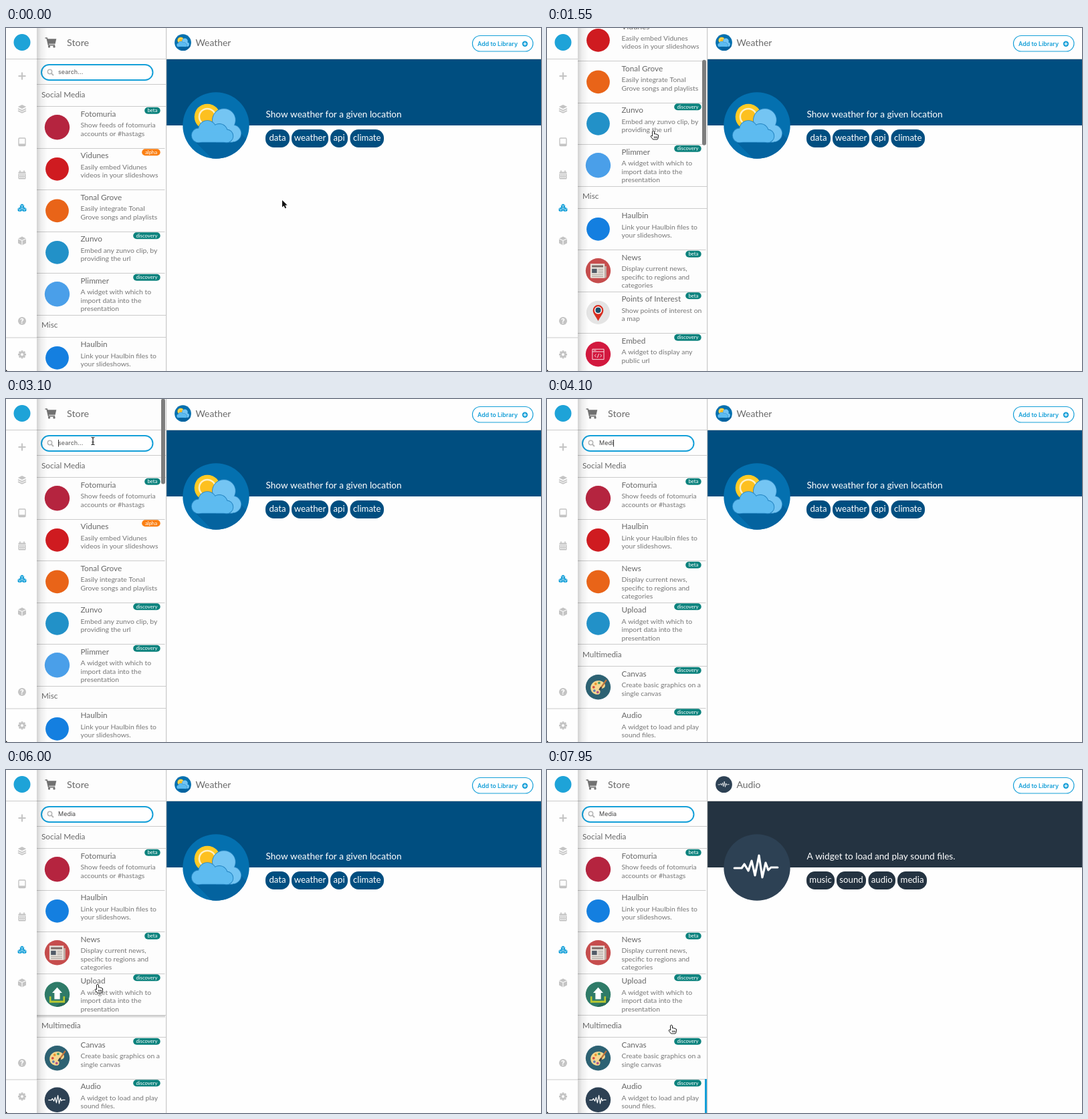
An HTML page with a canvas that plays this animation: 800 by 514 pixels, repeating every 8000 ms.

```html
<!DOCTYPE html>
<html lang="en">
<head>
<meta charset="utf-8">
<title>Widget store</title>
<style>
html, body { margin: 0; width: 100%; height: 100%; overflow: hidden; background: #fff; }
canvas { display: block; width: 800px; height: 514px; }
</style>
</head>
<body>
<canvas id="stage"></canvas>
<script>
const W = 800, H = 514, LOOP = 8000;
const canvas = document.getElementById('stage');
const ctx = canvas.getContext('2d');
const dpr = window.devicePixelRatio || 1;
canvas.width = W * dpr;
canvas.height = H * dpr;

const BLUE = '#149fd8', TEAL = '#0b827d', INK = '#696969', PALE = '#c4c4c4', RULE = '#cbcbcb';
const ROUND = 'Lato, "Open Sans", sans-serif', UI = 'Inter, Roboto, sans-serif';
const LIST_TOP = 84.5, SECTION = 33, ITEM = 62.5;
const ICONS_READY = 4400, FILTERED = 3950, OPENED = 7500;

// ---- content: strings are section headings, arrays are [title, icon, badge, ...lines]
const fotomuria = ['Fotomuria', 'berry', 'beta', 'Show feeds of fotomuria', 'accounts or #hastags'];
const haulbin = ['Haulbin', '#147fe0', '', 'Link your Haulbin files to', 'your slideshows.'];
const news = ['News', 'news', 'beta', 'Display current news,', 'specific to regions and', 'categories'];
const importLines = ['A widget with which to', 'import data into the', 'presentation'];
const allRows = [
  'Social Media',
  fotomuria,
  ['Vidunes', '#cf1b20', 'alpha', 'Easily embed Vidunes', 'videos in your slideshows'],
  ['Tonal Grove', '#e96418', '', 'Easily integrate Tonal', 'Grove songs and playlists'],
  ['Zunvo', '#2291c8', 'discovery', 'Embed any zunvo clip, by', 'providing the url'],
  ['Plimmer', 'sky', 'discovery', ...importLines],
  'Misc',
  haulbin,
  news,
  ['Points of Interest', 'pin', 'beta', 'Show points of interest on', 'a map'],
  ['Embed', 'embed', 'discovery', 'A widget to display any', 'public url'],
  'Zorvil',
  ['Zorvil Slides', 'slides', 'beta', 'Embed your slides', 'in a slideshow'],
];
const foundRows = [
  'Social Media',
  fotomuria,
  haulbin,
  news,
  ['Upload', 'upload', 'discovery', ...importLines],
  'Multimedia',
  ['Canvas', 'palette', 'discovery', 'Create basic graphics on a', 'single canvas'],
  ['Audio', 'audio', 'discovery', 'A widget to load and play', 'sound files.'],
];
const pages = {
  weather: {
    title: 'Weather', icon: 'weather', color: '#004e80', text: 'Show weather for a given location',
    tags: [['data', 388, 36], ['weather', 427, 55], ['api', 485, 26], ['climate', 514.5, 50.5]],
  },
  audio: {
    title: 'Audio', icon: 'audio', color: '#243341', text: 'A widget to load and play sound files.',
    tags: [['music', 388, 42], ['sound', 433, 44], ['audio', 480.5, 40.5], ['media', 524, 44]],
  },
};

// ---- motion: [time, value...] keys
const scrollKeys = [[900, 0], [1550, 193], [1950, 255], [2200, 265], [2400, 265], [2900, 0]];
const mouseKeys = [
  [250, 413, 258], [900, 159, 154], [2700, 159, 154], [3050, 130, 63], [5200, 130, 63],
  [5850, 137, 321], [6500, 137, 321], [7200, 160, 484], [7550, 160, 484], [7900, 186, 382],
];
const typing = [[3600, 'M'], [3750, 'Me'], [3900, 'Med'], [4050, 'Medi'], [4200, 'Media']];
const smooth = u => u * u * (3 - 2 * u);

function track(keys, t, ease = u => u) {
  const i = keys.findIndex(k => k[0] > t);
  if (i === 0) return keys[0].slice(1);
  if (i < 0) return keys[keys.length - 1].slice(1);
  const a = keys[i - 1], b = keys[i], u = ease((t - a[0]) / (b[0] - a[0]));
  return a.slice(1).map((v, n) => v + (b[n + 1] - v) * u);
}

// ---- drawing helpers
function text(s, x, y, size, color, align = 'left', family = ROUND, weight = 400) {
  ctx.font = `${weight} ${size}px ${family}`;
  ctx.textAlign = align;
  ctx.fillStyle = color;
  ctx.fillText(s, x, y);
}
function rect(x, y, w, h, color) {
  ctx.fillStyle = color;
  ctx.fillRect(x, y, w, h);
}
function rule(y, width) {
  rect(46, Math.floor(y), width, 1, RULE);
}
function pill(x, y, w, h, r, color, line) {
  ctx.beginPath();
  ctx.roundRect(x, y, w, h, r);
  if (color) { ctx.fillStyle = color; ctx.fill(); }
  if (line) { ctx.lineWidth = line[0]; ctx.strokeStyle = line[1]; ctx.stroke(); }
}
function disc(x, y, r, color) {
  ctx.beginPath();
  ctx.arc(x, y, r, 0, 7);
  ctx.fillStyle = color;
  ctx.fill();
}
function shape(d, color) {
  ctx.fillStyle = color;
  ctx.fill(new Path2D(d));
}
function line(d, width, color) {
  ctx.lineWidth = width;
  ctx.strokeStyle = color;
  ctx.stroke(new Path2D(d));
}
function at(x, y, scale, draw) {
  ctx.save();
  ctx.translate(x, y);
  ctx.scale(scale, scale);
  draw();
  ctx.restore();
}
// a cloud: round bumps on a flat base, with a thin edge
function cloud(circles, left, right, color) {
  const edge = '#2383c0', top = 10, base = 25;
  for (const [x, y, r] of circles) disc(x, y, r + 0.9, edge);
  rect(left, top, right - left, base - top + 0.9, edge);
  for (const [x, y, r] of circles) disc(x, y, r, color);
  rect(left, top, right - left, base - top, color);
}

// ---- round icons, radius 50 around the origin
const icons = {
  berry() { disc(0, 0, 50, '#b5243f'); },
  sky() { disc(0, 0, 50, '#4a9fe9'); },
  weather() {
    disc(0, 0, 50, '#0470af');
    ctx.save();
    ctx.beginPath();
    ctx.arc(0, 0, 50, 0, 7);
    ctx.clip();
    shape('M-34 22L0 56H60V36L32 6Z', '#04639f');
    ctx.restore();
    disc(-13, -13, 19.5, '#ffcb26');
    disc(-13, -13, 13.5, '#fdf0c4');
    disc(-13, -13, 11, '#fdc01f');
    cloud([[12, -8, 17], [25, 12, 12.5]], 0, 25, '#74c5f3');
    cloud([[-26, 15, 10.5], [-13, 6, 13], [5, 10, 12], [16, 16, 9.5]], -26, 16, '#5dbbf0');
  },
  audio() {
    disc(0, 0, 50, '#2d4154');
    ctx.lineJoin = ctx.lineCap = 'round';
    line('M-34 1H-23L-19 -5L-13 5L-8 -10L-3 12L3 -18L8 15L13 -7L17 4L21 0H31', 3.2, '#fff');
  },
  news() {
    disc(0, 0, 50, '#c64d4d');
    shape('M-31 -28H26V29H-27Q-31 29 -31 25Z', '#e9e3dc');
    shape('M26 -18H33V23Q33 29 26 29Z', '#bdb4ac');
    shape('M-25 -22H20V-14H-25Z', '#7d6a66');
    shape('M-25 -8H-5V9H-25Z', '#525c68');
    line('M0 -6H20M0 1H20M0 8H20M-25 16H20M-25 23H20', 2.5, '#a49c97');
  },
  pin() {
    disc(0, 0, 47, '#e4e4e4');
    shape('M0 34C-8 16 -21 6 -21 -9A21 21 0 0 1 21 -9C21 6 8 16 0 34Z', '#d72d20');
    disc(0, -9, 15, '#fff');
    disc(0, -9, 11, '#1d4d68');
  },
  embed() {
    disc(0, 0, 50, '#d2183e');
    line('M-23 -20H23V21H-23ZM-23 -10H23', 2.3, '#fff');
    line('M-8 0L-14 6L-8 12M8 0L14 6L8 12M3 -2L-3 14', 2.3, '#fff');
    line('M-18 -15H-8', 2, '#fff');
  },
  upload() {
    disc(0, 0, 50, '#2f7b68');
    shape('M-5 50L32 14L48 20Q35 48 0 50Z', '#286a59');
    shape('M-31 8H-24V25H24V8H31V33H-31Z', '#b9c832');
    shape('M0 -28L20 -6H11V19H-11V-6H-20Z', '#fff');
  },
  palette() {
    disc(0, 0, 50, '#2d6273');
    shape('M-30 6C-32 -17 -9 -30 10 -25C28 -20 32 -5 24 2C15 9 6 4 8 15C10 28 1 31 -9 29C-21 26 -29 18 -30 6Z', '#f4d78f');
    [[-18, 0, '#d94a3c'], [-10, -13, '#e9962b'], [4, -17, '#4b9d68'], [-15, 14, '#5b7fb4'], [-2, 20, '#b0518a']]
      .forEach(([x, y, c]) => disc(x, y, 5, c));
    line('M33 -29L7 8', 6, '#bd713b');
    line('M13 0L5 12', 7, '#39434b');
  },
  slides() { shape('M-34 -34H34V34H-34Z', '#f5ba32'); },
};
function icon(name, x, y, r) {
  if (!name) return;
  if (name[0] === '#') disc(x, y, r * 0.93, name);
  else at(x, y, r / 50, icons[name]);
}

// ---- side bar
function cube(x, y, r, color) {
  at(x, y, r, () => {
    shape('M0 -1L.92 -.55V.55L0 1L-.92 .55V-.55Z', color);
    line('M-.92 -.5L0 -.08L.92 -.5M0 -.08V1', 0.17, '#fff');
  });
}
function sideBar() {
  const shade = ctx.createLinearGradient(46, 0, 62, 0);
  shade.addColorStop(0, 'rgba(0,0,0,.17)');
  shade.addColorStop(0.4, 'rgba(0,0,0,.06)');
  shade.addColorStop(1, 'rgba(0,0,0,0)');
  rect(46, 0, 16, H, shade);
  rect(0, 0, 46, H, '#fefefe');
  rect(0, 46, 46, 1, RULE);
  rect(0, 463.5, 46, 1, RULE);
  disc(24, 21.5, 12.5, '#1ea3d8');
  line('M18.5 72H29.5M24 66.5V77.5', 2, PALE);
  at(24, 121, 1, () => {
    shape('M0 -6L6.2 -3L0 0L-6.2 -3Z', PALE);
    line('M-6 0L0 2.8L6 0M-6 3L0 5.8L6 3', 1.7, PALE);
  });
  pill(19, 165, 10, 11.5, 1.2, null, [1.4, PALE]);
  rect(19, 173.5, 10, 3, PALE);
  at(24, 220, 1, () => {
    pill(-5.5, -4.5, 11, 11, 1, PALE);
    line('M-3 -6.5V-3.5M3 -6.5V-3.5', 1.6, PALE);
    line('M-5.5 -1.8H5.5', 0.8, '#fff');
    for (let i = 0; i < 6; i++) rect(-4 + (i % 3) * 3, -0.4 + (i > 2) * 3.2, 1.8, 1.8, '#fff');
  });
  cube(24, 267, 3.4, BLUE);
  cube(20.7, 272.2, 3.4, BLUE);
  cube(27.3, 272.2, 3.4, BLUE);
  cube(24, 319, 6.5, PALE);
  disc(24, 439, 6, PALE);
  text('?', 24, 442.6, 10, '#fff', 'center', UI, 800);
  at(24, 489.3, 1, () => {
    for (let i = 0; i < 8; i++) {
      ctx.rotate(Math.PI / 4);
      rect(-1.4, -6, 2.8, 3, PALE);
    }
    disc(0, 0, 4.6, PALE);
    disc(0, 0, 2, '#fff');
  });
  shape('M0 512L2 514H0Z', '#000');
}

// ---- store list
function badge(label, top) {
  const w = { beta: 23.5, alpha: 27.5, discovery: 40.5 }[label];
  pill(230.7 - w, top + 1.2, w, 10, 5, label === 'alpha' ? '#fb7f12' : TEAL);
  text(label, 230.7 - w / 2, top + 8.8, 7.7, '#fff', 'center');
}
function item([title, picture, tag, ...lines], top) {
  icon(picture, 76.5, top + 31.3, 18.7);
  text(title, 111.5, top + 15, 11.8, INK);
  lines.forEach((s, i) => text(s, 111.5, top + 31.7 + i * 12.4, 10.4, '#777'));
  if (tag) badge(tag, top);
  rule(top + ITEM, 191.5);
}
function storeHead(t) {
  at(67, 21.5, 1, () => {
    line('M-8.5 -6.5H-5.8L-3.4 4.2H6.2', 1.7, '#717171');
    shape('M-5.6 -5.3H8.3L6.6 2.3H-3.8Z', '#717171');
    disc(-2.5, 6.4, 1.7, '#717171');
    disc(5, 6.4, 1.7, '#717171');
  });
  text('Store', 91, 27, 14.3, INK);
  rule(46, 193);
  pill(53, 55, 166.5, 23, 11.5, '#fff', [2, BLUE]);
  ctx.beginPath();
  ctx.arc(65.5, 65.5, 3.2, 0, 7);
  ctx.lineWidth = 1.5;
  ctx.strokeStyle = '#b5b5b5';
  ctx.stroke();
  line('M67.8 67.8L71 71', 1.9, '#b5b5b5');
  const typed = typing.reduce((s, [when, word]) => t >= when ? word : s, '');
  text(typed || 'search...', 78, 69.3, 9, typed ? '#444' : '#707070', 'left', UI, typed ? 400 : 500);
  const blink = t < 4250 || (t - 4250) % 1000 < 500;
  if (t > 3050 && t < OPENED && blink) {
    const w = typed ? ctx.measureText(typed).width : 0;
    rect(78 + w, 61, 1, 10.5, '#333');
  }
}
function store(t, scroll, mouse) {
  const found = t >= FILTERED;
  const rows = found ? foundRows : allRows;
  rect(46, 0, 194, H, '#fdfdfd');
  ctx.save();
  ctx.beginPath();
  ctx.rect(46, 0, 194, H);
  ctx.clip();
  ctx.translate(0, -scroll);
  storeHead(t);
  let top = LIST_TOP;
  rows.forEach((row, i) => {
    if (typeof row === 'string') {
      rule(top, 193);
      text(row, 53, top + 19.3, 11.8, INK);
      top += SECTION;
      rule(top, 193);
      return;
    }
    // pictures lag behind the filtered text
    const stale = found && t < ICONS_READY && row[1] !== 'palette';
    const picture = !stale ? row[1] : i < 5 ? allRows[i][1] : '';
    item([row[0], picture, ...row.slice(2)], top);
    const over = mouse[0] < 240 && mouse[1] > top && mouse[1] < top + ITEM;
    if (t > 5200 && over) {
      const glow = ctx.createLinearGradient(0, top + 61, 0, top + 67);
      glow.addColorStop(0, 'rgba(0,0,0,.32)');
      glow.addColorStop(1, 'rgba(0,0,0,0)');
      rect(46, top + 62, 192, 5, glow);
    }
    if (t >= OPENED && row[0] === 'Audio') rect(236, top, 3.5, 62, BLUE);
    top += ITEM;
  });
  ctx.restore();
  rect(239, 0, 1.2, H, '#c9c9c9');
  if (t > 900 && t < 3350) {
    ctx.globalAlpha = Math.min(1, (3350 - t) / 200);
    pill(232, scroll * 0.25 - 0.5, 6, 128, 3, '#7d7d7d');
    ctx.globalAlpha = 1;
  }
}

// ---- details
function details({ title, icon: picture, color, text: about, tags }) {
  rect(240, 0, 560, H, '#fefefe');
  rect(240, 46, 560, 1, RULE);
  icon(picture, 264.5, 21.7, 12.4);
  text(title, 283.5, 27, 13.9, INK);
  pill(697.5, 11.5, 90.5, 23.5, 11.7, '#fff', [1.2, BLUE]);
  text('Add to Library', 705, 27, 8.8, BLUE, 'left', UI, 600);
  disc(776, 23.8, 4.2, BLUE);
  line('M773.5 23.8H778.5M776 21.3V26.3', 1.2, '#fff');
  rect(240, 47, 560, 99, color);
  icon(picture, 314, 146, 49.7);
  text(about, 388.5, 133.7, 13.6, '#fff');
  for (const [word, x, w] of tags) {
    pill(x, 152, w, 27, 12.5, color);
    text(word, x + w / 2, 169.3, 13.2, '#fff', 'center');
  }
}

// ---- pointer
function pointer([x, y], t) {
  if (t > 3500 && t < 5200) return;
  const field = x > 52 && x < 220 && y > 54 && y < 78 && t > 2900;
  at(x, y, 1, () => {
    ctx.lineJoin = 'round';
    if (field) {
      line('M-2.5 -5.5Q0 -5.5 0 -4Q0 -5.5 2.5 -5.5M0 -4.5V4.5M-2.5 5.5Q0 5.5 0 4Q0 5.5 2.5 5.5M-1.5 1.5H1.5', 1.2, '#222');
    } else if (x < 240) {
      const hand = 'M-1.5 1Q0 -1 1.5 1V5Q3 4 4 5.2Q5.5 4.6 6 6Q7.5 5.6 7.5 7V9Q7.5 11 6 13H-.5L-4 8.5Q-4 6.5 -1.5 8Z';
      shape(hand, '#fff');
      line(hand + 'M1.5 8.5V11M3.5 8.5V11M5.3 8.5V11', 1, '#222');
    } else {
      const arrow = 'M0 0V10.6L2.5 8.3L4.3 12.3L6.1 11.5L4.4 7.6H7.6Z';
      line(arrow, 1.4, '#fff');
      shape(arrow, '#111');
    }
  });
}

function frame(now) {
  const t = now % LOOP;
  const mouse = track(mouseKeys, t, smooth);
  const scroll = Math.round(track(scrollKeys, t)[0]);
  ctx.setTransform(dpr, 0, 0, dpr, 0, 0);
  ctx.lineCap = 'butt';
  ctx.lineJoin = 'miter';
  details(t < OPENED ? pages.weather : pages.audio);
  store(t, scroll, mouse);
  sideBar();
  pointer(mouse, t);
}
const start = performance.now();
function tick() {
  frame(performance.now() - start);
  requestAnimationFrame(tick);
}
tick();
</script>
</body>
</html>
```
